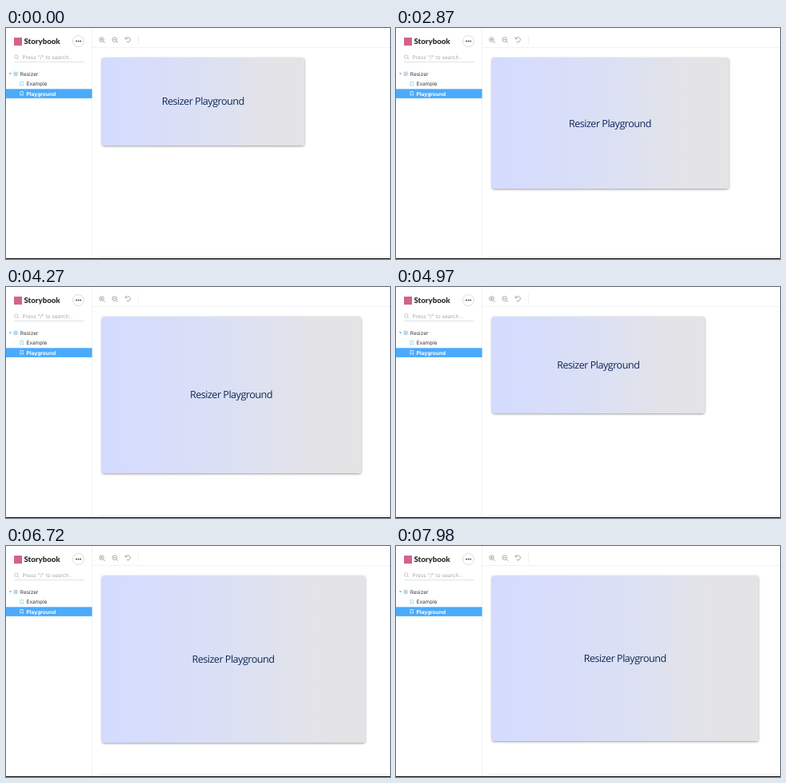
Animation, 480 px wide and 289 px high, one loop 8 s. Source, as an HTML page:

```html
<!DOCTYPE html>
<html lang="en">
<head>
<meta charset="utf-8">
<title>Resizer Playground</title>
<style>
  html, body { margin: 0; width: 100%; height: 100%; overflow: hidden; background: #fff; }
  svg { position: absolute; left: 0; top: 0; font: 6.5px Inter, sans-serif; text-rendering: geometricPrecision; }
  .line { fill: none; stroke: #a0a0a0; stroke-width: .9; }
  #box {
    position: absolute; left: 119.5px; top: 37px;
    display: flex; align-items: center; justify-content: center;
    border-radius: 3px;
    background: linear-gradient(90deg, #d4dbff, #dbe0f4 50%, #e3e3e8 80%, #e4e4e6);
    box-shadow: 0 1px 3px rgba(0, 0, 0, .4);
    font: 500 12.6px/14px "Open Sans", sans-serif; letter-spacing: -.5px;
    color: #0f2858; white-space: nowrap; text-rendering: geometricPrecision;
  }
  #label { position: relative; top: .5px; }
  .selected { background: #cbdfdf; }
</style>
</head>
<body>
<svg width="480" height="289" viewBox="0 0 480 289">
  <defs>
    <g id="lens" class="line"><circle r="2.8"/><path d="M2 2l2.2 2.2"/></g>
    <path id="bookmark" d="M-1.7-2.5h3.4v5l-1.7-1.4-1.7 1.4z" fill="none" stroke-width=".7"/>
  </defs>

  <path d="M107.5 0V288M108 24.5H480" stroke="#f1f2f3"/>
  <path d="M116 285.5H480" stroke="#f4f4f4"/>
  <path d="M0 288.5H480" stroke="#111"/>

  <rect x="10" y="12" width="10" height="10" fill="#d2638c"/>
  <text x="22.5" y="20.2" font-family="Lato, sans-serif" font-size="9.6" font-weight="900" fill="#333">Storybook</text>
  <circle cx="90.5" cy="16.5" r="7" fill="#fff" stroke="#d5d9dd" stroke-width=".9"/>
  <g fill="#444"><circle cx="88" cy="16.5" r=".9"/><circle cx="90.6" cy="16.5" r=".9"/><circle cx="93.2" cy="16.5" r=".9"/></g>

  <use href="#lens" transform="translate(12.8 36) scale(.8)" opacity=".8"/>
  <text x="20.5" y="39" fill="#a3a8ad">Press "/" to search...</text>
  <path d="M10 42.5H98" stroke="#dfe4e9"/>

  <path d="M3.8 56.2h3.4l-1.7 2.3z" fill="#91a8b8"/>
  <path d="M10 55.2h4.2v4.4h-4.2zM10 57.4h4.2M12.1 55.2v4.4" fill="#d9eefb" stroke="#8fc0de" stroke-width=".6"/>
  <text x="17.8" y="60" fill="#3a3a3a">Resizer</text>
  <use href="#bookmark" x="19.6" y="70" stroke="#86cde0"/>
  <text x="25.5" y="72.3" fill="#3a3a3a">Example</text>
  <rect y="76.3" width="107.6" height="11.6" fill="#4baafa"/>
  <use href="#bookmark" x="19.6" y="82" stroke="#fff"/>
  <text x="25.5" y="84.6" font-size="6.6" font-weight="700" fill="#fff">Playground</text>

  <use href="#lens" x="119.5" y="14.5"/>
  <use href="#lens" x="135.8" y="14.5"/>
  <path class="line" d="M118 14.5h3M119.5 13v3M134.3 14.5h3M149.3 11.3v2.4h2.4M149.7 13.4a3 3 0 1 1 .9 3.6"/>
  <path d="M165.5 9V20" stroke="#eceef0"/>
</svg>
<div id="box"><span id="label">Resizer Playground</span></div>

<script>
const LOOP = 8000, STEP = 70;
// Turning points of the drag
const drag = [
  { at: 2520, width: 253.5, height: 109.5 },
  { at: 2870, width: 296, height: 164 },
  { at: 3290, width: 315, height: 204 },
  { at: 4270, width: 324, height: 195.5 },
  { at: 4690, width: 276, height: 203 },
  { at: 5110, width: 262, height: 80 },
  { at: 5810, width: 322.5, height: 53 },
  { at: 6720, width: 329, height: 208.5 },
  { at: 7980, width: 333.5, height: 207 }
];
const box = document.getElementById('box');
const label = document.getElementById('label');
const mix = (a, b, k) => a + (b - a) * k;

function draw() {
  const time = Math.floor(performance.now() % LOOP / STEP) * STEP;
  const next = Math.max(1, drag.findIndex(point => point.at >= time));
  const from = drag[next - 1], to = drag[next];
  const k = Math.max(0, (time - from.at) / (to.at - from.at));
  box.style.width = mix(from.width, to.width, k) + 'px';
  box.style.height = mix(from.height, to.height, k) + 'px';
  label.className = time >= 5110 && time < 6580 ? 'selected' : '';
  requestAnimationFrame(draw);
}
draw();
</script>
</body>
</html>
```
